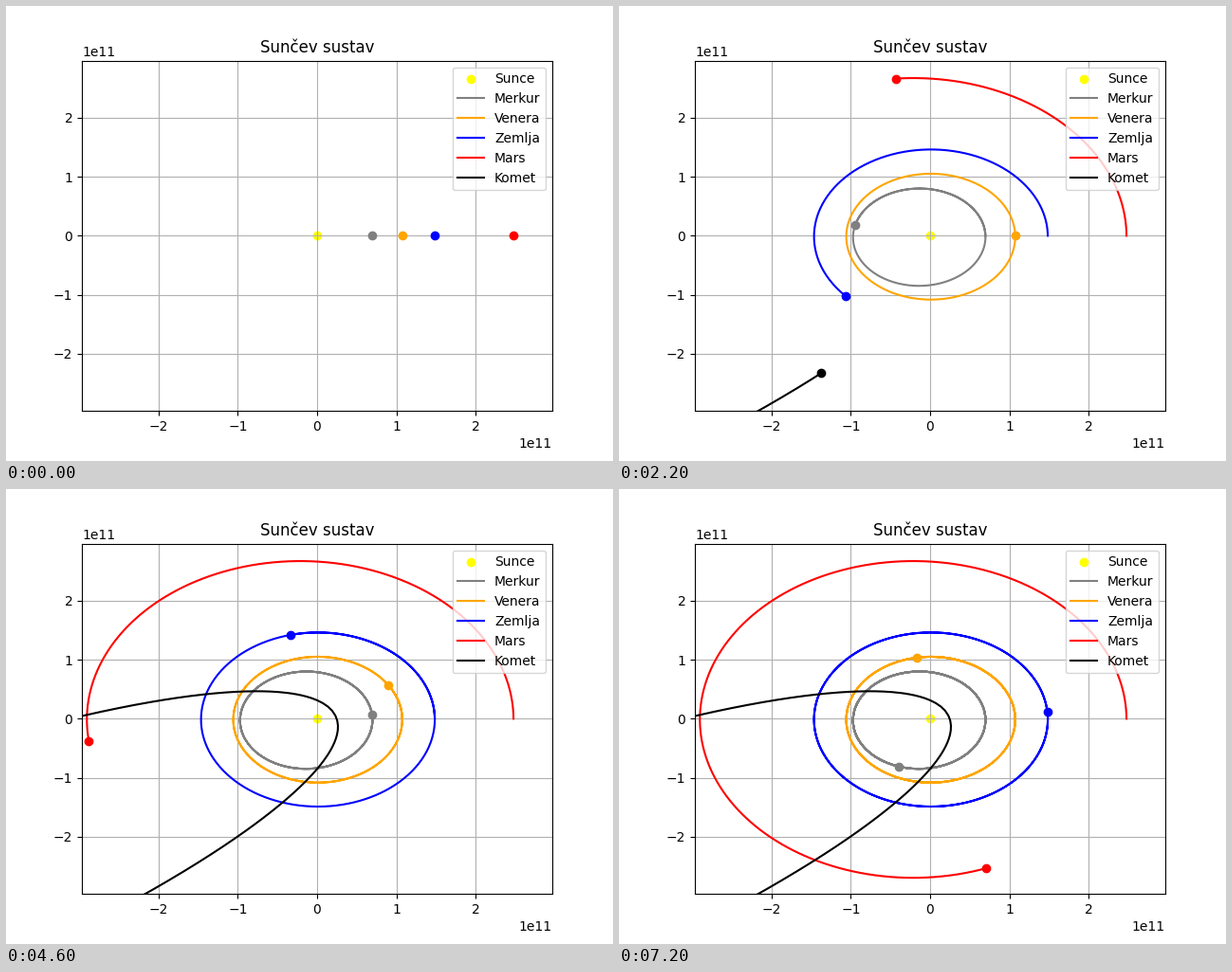
Write a matplotlib script that moves like this. It is 640 by 480 pixels and loops after 7300 ms.

```python
import numpy as np
import matplotlib.pyplot as plt
from matplotlib.animation import FuncAnimation

GM = 1.3275e20          # gravity of the sun, m^3/s^2
DAY = 86400
DAYS_PER_FRAME = 10
FRAMES = 73
DAYS = DAYS_PER_FRAME * (FRAMES - 1) + 1
LIMIT = 2.97e11

# name, colour, starting distance (m), starting speed (m/s)
PLANETS = [
    ("Merkur", "gray", 6.99e10, 47000),
    ("Venera", "orange", 1.075e11, 35000),
    ("Zemlja", "blue", 1.486e11, 29783),
    ("Mars", "red", 2.48e11, 24035),
]


def planet_path(distance, speed):
    """Daily positions by the Euler-Cromer method, starting on the x axis."""
    pos = np.array([distance, 0.0])
    vel = np.array([0.0, speed])
    path = [pos]
    for _ in range(DAYS - 1):
        vel = vel - GM * pos / np.hypot(*pos) ** 3 * DAY
        pos = pos + vel * DAY
        path.append(pos)
    return np.array(path)


def comet_path(a=7.592e11, e=0.9693, tilt=np.radians(28.38), closest=299.67):
    """Daily positions on a long Kepler ellipse with the sun in one focus."""
    mean = np.sqrt(GM / a**3) * DAY * (np.arange(DAYS) - closest)
    ecc = np.sign(mean) * np.pi
    for _ in range(40):
        ecc = ecc - (ecc - e * np.sin(ecc) - mean) / (1 - e * np.cos(ecc))
    u = a * (np.cos(ecc) - e)
    v = a * np.sqrt(1 - e**2) * np.sin(ecc)
    c, s = np.cos(tilt), np.sin(tilt)
    return np.column_stack([c * u - s * v, s * u + c * v])


bodies = [(name, color, planet_path(r, v)) for name, color, r, v in PLANETS]
bodies.append(("Komet", "black", comet_path()))

fig, ax = plt.subplots(figsize=(6.4, 4.8), dpi=100)
ax.set_title("Sunčev sustav")
ax.set_xlim(-LIMIT, LIMIT)
ax.set_ylim(-LIMIT, LIMIT)
ax.grid()
ax.scatter(0, 0, color="yellow", label="Sunce")

trails = [ax.plot([], [], color=color, label=name)[0] for name, color, _ in bodies]
dots = [ax.plot([], [], "o", color=color)[0] for _, color, _ in bodies]
ax.legend(loc="upper right")


def draw(frame):
    day = frame * DAYS_PER_FRAME
    for (_, _, path), trail, dot in zip(bodies, trails, dots):
        trail.set_data(path[:day + 1, 0], path[:day + 1, 1])
        dot.set_data(path[day:day + 1, 0], path[day:day + 1, 1])
    return trails + dots


anim = FuncAnimation(fig, draw, frames=FRAMES, interval=100, repeat=True)
plt.show()
```
